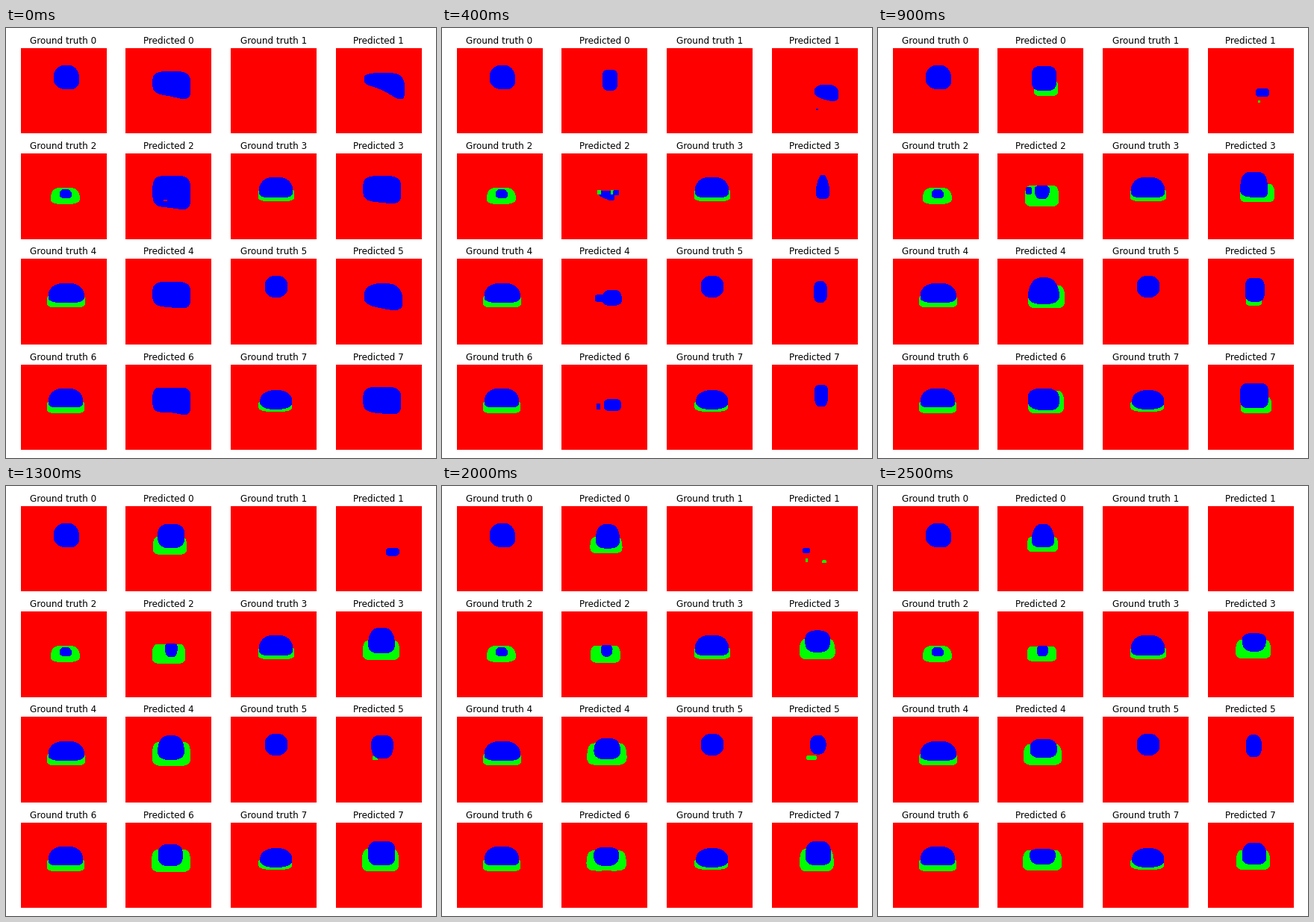
A matplotlib script for the animation above (4 s loop, 576 px wide and 576 px high).

```python
import numpy as np
import matplotlib.pyplot as plt
from matplotlib.animation import FuncAnimation
from matplotlib.patches import Polygon, Rectangle

SIZE, DPI = 576, 72
RED, GREEN, BLUE = "#ff0000", "#00ff00", "#0000ff"
FRAMES, LAST = 40, 25

rng = np.random.default_rng(3)
plt.rcParams["font.family"] = "DejaVu Sans"
fig = plt.figure(figsize=(SIZE / DPI, SIZE / DPI), dpi=DPI, facecolor="white")
ax = fig.add_axes([0, 0, 1, 1])
ax.set(xlim=(0, SIZE), ylim=(SIZE, 0))
ax.axis("off")


def pose(l, t, r, b, taper=0.0, drop=0.0, dip=0.0, arch=0.0, p=2.6):
    """Bounding box inside a panel plus the deformation of a superellipse."""
    return np.array([l, t, r, b, taper, drop, dip, arch, p], float)


def slab(top, bottom, drop=0.15, dip=0.0):
    """The untrained network's wide block."""
    return pose(36.8, top, 87, bottom, drop=drop, dip=dip, arch=dip, p=3.4)


def saddle(l, t, r, b):
    """Two-lobed band that carries the blue region."""
    return pose(l, t, r, b, taper=0.08, dip=0.35, arch=0.18, p=2.9)


def gone(q):
    """The same pose shrunk to its centre."""
    q = q.copy()
    q[[0, 2]] = q[[0, 2]].mean()
    q[[1, 3]] = q[[1, 3]].mean()
    return q


def fit(z, lo, hi):
    return lo + (hi - lo) * (z - z.min()) / np.ptp(z)


def outline(q):
    l, t, r, b, taper, drop, dip, arch, p = q
    a = np.linspace(0, 2 * np.pi, 160, endpoint=False)
    u, v = (np.sign(f) * np.abs(f) ** (2 / p) for f in (np.cos(a), np.sin(a)))
    low, high, mid = (1 + v) / 2, (1 - v) / 2, 1 - u**2
    x = u * (1 + taper * v)
    # drop lowers the right end, dip dents the top, arch lifts the bottom
    y = v + 2 * drop * low * ((u + 1) / 2) ** 2 + mid * (dip * high - arch * low)
    return np.column_stack([fit(x, l, r), fit(y, t, b)])


def corner(k):
    row, col = divmod(k, 4)
    return round(19.7 + 140.75 * col), round(26.8 + 141.25 * row)


def blob(k, color, q, zorder):
    art = Polygon(outline(q) + corner(k), color=color, lw=0,
                  antialiased=False, zorder=zorder)
    return ax.add_patch(art)


class Track:
    """A region whose pose runs between key steps with a little jitter."""

    def __init__(self, panel, color, zorder, poses):
        self.k = 2 * panel + 1
        self.steps = np.array(sorted(poses))
        self.poses = np.array([poses[s] for s in self.steps])
        self.jitter = rng.normal(0, 0.7, (LAST + 1, 4))
        self.art = blob(self.k, color, pose(0, 0, 1, 1), zorder)

    def draw(self, step):
        q = np.array([np.interp(step, self.steps, c) for c in self.poses.T])
        shown = min(q[2] - q[0], q[3] - q[1]) > 1
        self.art.set_visible(shown)
        if shown:
            phase = np.interp(step, self.steps, np.arange(len(self.steps)))
            q[:4] += self.jitter[step] * abs(np.sin(np.pi * phase))
            self.art.set_xy(outline(q) + corner(self.k))


tracks, spots = [], []


def blue(panel, poses):
    tracks.append(Track(panel, BLUE, 4, poses))


def green(panel, poses):
    first = poses[min(poses)]
    tracks.append(Track(panel, GREEN, 3, {4: gone(first), **poses}))


def spot(panel, step, color, *box):
    """A stray region that lasts one step."""
    spots.append((step, blob(2 * panel + 1, color, pose(*box, p=2.2), 5)))


# Panels and titles
for k in range(16):
    row, col = divmod(k, 4)
    x0, y0 = corner(k)
    y1 = round(26.8 + 141.25 * row + 114.5)
    ax.add_patch(Rectangle((x0, y0), 115, y1 - y0, color=RED, lw=0,
                           antialiased=False, zorder=1))
    name = "Predicted" if col % 2 else "Ground truth"
    ax.text(76.9 + 140.75 * col, 20.8 + 141.25 * row, f"{name} {k // 2}",
            fontsize=12, ha="center", va="baseline")

# Ground truth: two discs, a small saddle, and four caps in shallow cups
blob(0, BLUE, pose(44, 23, 78, 55, taper=0.08, drop=0.1, p=2.2), 2)
blob(10, BLUE, pose(46, 23, 76, 52, p=2.1), 2)
blob(4, GREEN, pose(40, 46.5, 78.5, 67.5, taper=0.2, dip=0.25, arch=0.05), 2)
blob(4, BLUE, pose(52, 48, 67.5, 60, taper=0.15, drop=0.1, p=2.2), 2)
for panel, cup, cap, arch in [
        (3, (37, 46, 85, 63.5), (38, 32, 83, 59), 0.25),
        (4, (35, 47, 86, 65), (37, 33, 84.5, 58.5), 0.25),
        (6, (35, 46, 85, 64.5), (37, 32, 83, 57), 0.35),
        (7, (37.5, 47, 82, 62.5), (39.5, 34.5, 82, 59.5), 0.0)]:
    blob(2 * panel, GREEN, pose(*cup, arch=arch * 0.8, p=3), 2)
    blob(2 * panel, BLUE, pose(*cap, taper=0.12, arch=arch, p=2.3), 2)

# Predictions: wide block, collapse, first split, settled pair
blue(0, {0: slab(31.5, 67.5, drop=0.35),
         4: pose(55, 29, 75, 56.5, p=3),
         9: pose(46, 24, 79, 57, p=3),
         13: pose(43.5, 24, 79, 56),
         25: pose(46, 24, 76, 55, taper=0.25)})
green(0, {9: saddle(49, 43, 81, 63.5),
          13: saddle(37, 41, 82, 64.5),
          25: saddle(40, 41, 81, 61)})

bean = pose(67, 56, 84.5, 66.5)
blue(1, {0: pose(38, 33.5, 91.5, 68, drop=1.6, p=3),
         4: pose(57, 49, 89, 70.5, drop=0.5, p=2.2),
         9: pose(64, 54, 82, 65),
         13: bean,
         17: gone(bean)})

blue(2, {0: slab(30.5, 74.5, drop=0.15, dip=0.08),
         4: pose(50, 50, 71, 63, drop=0.8, dip=0.5, p=2.2),
         9: pose(50, 43, 69.5, 61, taper=-0.2),
         13: pose(53, 43, 69.5, 61, taper=-0.2),
         25: pose(53, 46, 67.5, 60, taper=-0.1)})
green(2, {9: saddle(37, 43, 82, 71),
          13: saddle(36, 44, 80, 69.5),
          25: saddle(40, 47, 79, 66.5)})

blue(3, {0: slab(30.5, 66.5),
         4: pose(59, 29, 77, 60.5, taper=0.4),
         9: pose(43.5, 25, 80, 59, taper=0.12, drop=0.1, p=3.2),
         13: pose(43.5, 22, 78.5, 56, taper=0.15),
         25: pose(46, 29.5, 77.5, 53.5, taper=-0.12)})
green(3, {9: saddle(43, 41, 89, 65),
          13: saddle(36, 39, 85, 65),
          25: saddle(37.5, 38, 84, 63)})

blue(4, {0: slab(31, 66),
         4: pose(55, 42, 80.5, 62.5, taper=0.1),
         9: pose(41.5, 25.5, 82.5, 60.5, taper=0.2),
         13: pose(43.5, 25.5, 78.5, 57.5, taper=0.15),
         25: pose(44, 30, 79.5, 55, taper=0.05)})
green(4, {9: saddle(41, 36, 90, 66),
          13: saddle(36, 34, 87, 65.5),
          25: saddle(35, 37, 86, 64.5)})

sliver = pose(49, 53, 56, 58)
blue(5, {0: pose(38, 33.5, 89, 68.5, taper=0.08, drop=0.35),
         4: pose(56, 30.5, 73.5, 58.5),
         9: pose(50, 26, 75.5, 57.5, p=3),
         13: pose(47.5, 25, 76.5, 56, taper=-0.08),
         17: pose(52, 25, 73, 49, p=2.2),
         25: pose(51, 24.5, 71.5, 54, p=2.4)})
green(5, {9: pose(51, 50, 72, 63), 13: sliver, 17: gone(sliver)})

blue(6, {0: slab(31, 66.5, dip=0.2),
         4: pose(57, 46, 79.5, 62),
         9: pose(41, 32, 82.5, 61, drop=0.1),
         13: pose(44, 29, 76.5, 58),
         25: pose(43.5, 35, 77.5, 56, taper=-0.1)})
green(6, {9: saddle(41, 35, 89, 65),
          13: saddle(35, 36, 87, 66),
          25: saddle(34, 37, 86, 64)})

blue(7, {0: slab(30, 66),
         4: pose(57, 27, 75, 56, taper=-0.1),
         9: pose(43.5, 25, 80.5, 58, p=4),
         13: pose(43.5, 25, 79, 57, p=3.2),
         25: pose(46, 27, 78, 56, taper=0.12)})
green(7, {9: saddle(44, 43, 85, 65),
          13: saddle(35, 35, 84, 65),
          25: saddle(38, 37, 83, 63)})

# Stray regions
spot(1, 4, BLUE, 59.5, 81, 62, 82.5)
spot(1, 9, GREEN, 67, 70, 70, 72.5)
spot(1, 20, BLUE, 41.5, 56, 50.5, 63)
spot(1, 20, GREEN, 45, 70, 47.5, 75)
spot(1, 20, GREEN, 67.5, 72.5, 72.5, 76)
spot(2, 0, RED, 51, 62, 56, 64)
spot(2, 4, GREEN, 48, 49, 53, 55)
spot(2, 4, GREEN, 66, 49, 72, 55)
spot(2, 4, BLUE, 69.5, 49, 77, 56)
spot(2, 9, BLUE, 38, 45, 46, 55)
spot(4, 4, BLUE, 45, 48, 57, 58)
spot(5, 20, GREEN, 46, 52, 60, 58)
spot(6, 4, BLUE, 47, 52, 52, 60)


def draw(i):
    step = min(i, LAST)
    for track in tracks:
        track.draw(step)
    for when, art in spots:
        art.set_visible(when == step)
    return []


anim = FuncAnimation(fig, draw, frames=FRAMES, interval=100, repeat=True,
                     repeat_delay=0, blit=False)
plt.show()
```
